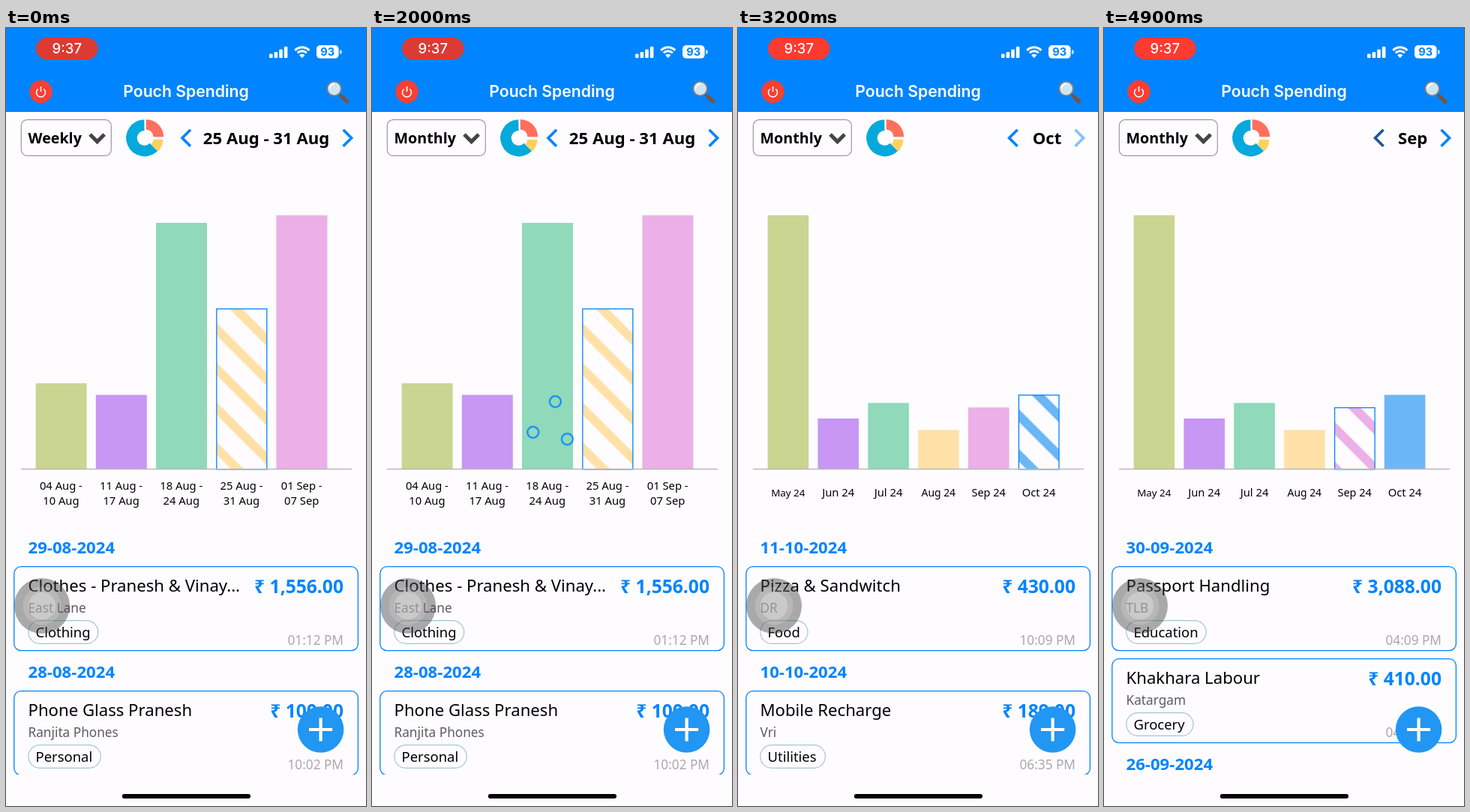
Recreate the animation shown at these times as an HTML page. Size 480 by 1038 pixels, loop 5 s.

```html
<!DOCTYPE html>
<html lang="en">
<head>
<meta charset="utf-8">
<title>Weekly and monthly spending</title>
<style>
html, body { margin: 0; width: 100%; height: 100%; overflow: hidden; background: #fefcff; }
svg { display: block; width: 100%; height: 100%; font-family: "Noto Sans", "Open Sans", sans-serif; }
.ui { font-family: Inter, Roboto, sans-serif; font-weight: 600; fill: #fff; text-anchor: middle; }
.bold { font-weight: 700; font-size: 22.15px; }
.date, .amount { font-weight: 700; fill: #0084ff; }
.date { font-size: 22.15px; }
.amount { font-size: 24.6px; text-anchor: end; }
.name { font-size: 22.15px; }
.shop, .time { font-size: 17.23px; fill: #5c5c5e; }
.time { fill: #aaa8ab; text-anchor: end; }
.tag { font-size: 18.46px; }
.tick { font-size: 14.77px; text-anchor: middle; }
.end { text-anchor: end; }
.mode { font-size: 19.7px; }
.line { fill: none; stroke: #0a84ff; stroke-width: 3.7; }

/* Hard switches on one shared 5 s clock */
.step { animation: 5s step-end infinite; }
.week { animation-name: week; }
.month { animation-name: month; }
.oct { animation-name: oct; }
.sep { animation-name: sep; }
.weekly { animation-name: weekly; }
.monthly { animation-name: monthly; }
.load { animation-name: load; }
.press { animation-name: press; }
@keyframes week { 0% { visibility: visible } 42%, 100% { visibility: hidden } }
@keyframes month { 0% { visibility: hidden } 42%, 100% { visibility: visible } }
@keyframes oct { 0% { visibility: hidden } 42% { visibility: visible } 86%, 100% { visibility: hidden } }
@keyframes sep { 0% { visibility: hidden } 86%, 100% { visibility: visible } }
@keyframes weekly { 0% { visibility: visible } 38%, 100% { visibility: hidden } }
@keyframes monthly { 0% { visibility: hidden } 38%, 100% { visibility: visible } }
@keyframes load { 0% { visibility: hidden } 38% { visibility: visible } 42%, 100% { visibility: hidden } }
@keyframes press { 0% { stroke: #0a84ff } 82% { stroke: #20579a } 84% { stroke: #0a84ff } 96%, 100% { stroke: #20579a } }

.rec { animation: pulse 5s ease-in-out infinite; }
@keyframes pulse { 0%, 40%, 80% { fill: #db3b33 } 20%, 60%, 100% { fill: #ff3b30 } }
.spin { animation: spin 1s linear infinite; }
@keyframes spin { to { transform: rotate(360deg) } }
</style>
</head>
<body>
<svg id="stage" viewBox="0 0 480 1038" preserveAspectRatio="none"></svg>
<script>
const BLUE = '#0084ff', PAPER = '#fefcff';
const COLORS = ['#c9d591', '#c797f3', '#90d9bb', '#ffe1a8', '#eab0e7', '#6bb6f7'];
const FLOOR = 588.5;

const text = (x, y, cls, str, extra = '') =>
  `<text x="${x}" y="${y}" class="${cls}" ${extra}>${str.replace(/&/g, '&amp;')}</text>`;
const step = (name, body) => `<g class="step ${name}">${body}</g>`;
const box = (x, y, w, h, r, attrs) =>
  `<rect x="${x}" y="${y}" width="${w}" height="${h}" rx="${r}" ${attrs}/>`;
const disc = (x, y, r, attrs) => `<circle cx="${x}" cy="${y}" r="${r}" ${attrs}/>`;

function arc(cx, cy, r, from, to, attrs) {
  const at = deg => {
    const a = deg * Math.PI / 180;
    return `${(cx + r * Math.cos(a)).toFixed(2)} ${(cy + r * Math.sin(a)).toFixed(2)}`;
  };
  return `<path d="M${at(from)}A${r} ${r} 0 ${to - from > 180 ? 1 : 0} 1 ${at(to)}" fill="none" ${attrs}/>`;
}

function bar(i, x, top, w, hatched) {
  const h = FLOOR - top, color = COLORS[i];
  if (!hatched) return box(x, top, w, h, 0, `fill="${color}"`);
  return `<g transform="translate(${x} ${top})">
    <pattern id="hatch${i}" width="10" height="37.4" patternUnits="userSpaceOnUse" patternTransform="rotate(45)">
      <rect y="13" width="10" height="12" fill="${color}"/></pattern>
    ${box(0, 0, w, h, 0, `fill="${PAPER}"`)}
    ${box(.6, .3, w - 1, h, 0, `fill="url(#hatch${i})" stroke="${BLUE}" stroke-width="1.3"`)}</g>`;
}

const axis = `<path d="M20 ${FLOOR}H461" stroke="#b9b7ba" stroke-width="1.3"/>`;

function weekChart() {
  const tops = [474, 489.5, 260, 374.5, 249.8];
  const labels = ['04 Aug -|10 Aug', '11 Aug -|17 Aug', '18 Aug -|24 Aug', '25 Aug -|31 Aug', '01 Sep -|07 Sep'];
  return tops.map((top, i) => {
    const x = 39.6 + i * 80.2, [a, b] = labels[i].split('|');
    return bar(i, x, top, 68, i === 3) + text(x + 33.8, 616, 'tick', a) + text(x + 33.8, 636, 'tick', b);
  }).join('') + axis;
}

const monthTops = [249.8, 521, 500.3, 536.3, 506.3, 489.5];
const monthX = i => 39.6 + i * 66.84;
const monthBar = (i, hatched) => bar(i, monthX(i), monthTops[i], 54.6, hatched);

function monthChart() {
  const names = ['May', 'Jun', 'Jul', 'Aug', 'Sep', 'Oct'];
  const sizes = [13.4, 14.77, 14.77, 13.9, 14.5, 14.77];
  return names.map((n, i) => (i < 4 ? monthBar(i) : '') +
    text(monthX(i) + 27.2, 625, 'tick', n + ' 24', `style="font-size:${sizes[i]}px"`)).join('');
}

const date = (y, str) => text(29.5, y, 'date', str);

function card(y, name, shop, tag, tagWidth, amount, time) {
  return box(10.8, y, 458.6, 112, 9, `fill="${PAPER}" stroke="${BLUE}" stroke-width="1.3"`) +
    text(29.5, y + 33.5, 'name', name) +
    text(29.5, y + 61.5, 'shop', shop) +
    box(29.8, y + 72, tagWidth, 30.6, 15.3, 'fill="none" stroke="#a3c8c8" stroke-width="1.2"') +
    text(39.5, y + 94, 'tag', tag) +
    text(450, y + 35.5, 'amount', '₹ ' + amount) +
    text(450, y + 104, 'time', time);
}

const weekList = date(700.5, '29-08-2024') +
  card(718.7, 'Clothes - Pranesh & Vinay...', 'East Lane', 'Clothing', 93, '1,556.00', '01:12 PM') +
  date(866.5, '28-08-2024') +
  card(884.7, 'Phone Glass Pranesh', 'Ranjita Phones', 'Personal', 96.5, '100.00', '10:02 PM');
const octList = date(700.5, '11-10-2024') +
  card(718.7, 'Pizza & Sandwitch', 'DR', 'Food', 63.2, '430.00', '10:09 PM') +
  date(866.5, '10-10-2024') +
  card(884.7, 'Mobile Recharge', 'Vri', 'Utilities', 86.6, '189.00', '06:35 PM');
const sepList = date(700.5, '30-09-2024') +
  card(718.7, 'Passport Handling', 'TLB', 'Education', 106.4, '3,088.00', '04:09 PM') +
  card(841.7, 'Khakhara Labour', 'Katargam', 'Grocery', 89.2, '410.00', '04:05 PM') +
  date(989.5, '26-09-2024');

function picker(label, shift) {
  const cx = 184.7 + shift;
  return box(20.3, 122.4, 120 + shift, 48, 8, 'fill="none" stroke="#9b999c" stroke-width="1.2"') +
    text(29.5, 154, 'bold mode', label) +
    `<path d="M${112 + shift} 142l9.6 9.6l9.6-9.6" fill="none" stroke="#454547" stroke-width="5"/>` +
    arc(cx, 146.8, 17.2, 45, 269, 'stroke="#06a9db" stroke-width="14.6"') +
    arc(cx + 2, 145.3, 16.6, -90, 0, 'stroke="#ff6f5e" stroke-width="13.6"') +
    arc(cx + 2.2, 148.6, 16, 1, 45, 'stroke="#ffd15c" stroke-width="13"');
}

const left = (x, cls = '') => `<path d="M${x + 10.6} 135.8l-11 11l11 11" class="line ${cls}"/>`;
const right = (opacity = 1) => `<path d="M449.6 135.8l11 11l-11 11" class="line" opacity="${opacity}"/>`;
const heading = str => text(431.3, 154.7, 'bold end', str);

function statusBar() {
  const bars = [5.5, 8, 11.5, 15.3].map((h, i) => box(351 + i * 6.6, 40 - h, 4.6, h, 1.3, 'fill="#fff"')).join('');
  const wifi = [13.2, 8.3].map(r => arc(394.8, 39, r, -136, -44, 'stroke="#fff" stroke-width="3.1"')).join('') +
    '<path d="M394.8 40l-3.6-3.8a5.2 5.2 0 0 1 7.2 0z" fill="#fff"/>';
  return box(40, 13, 82.6, 29, 14.5, 'class="rec"') +
    text(81.3, 34.2, 'ui', '9:37', 'style="font-size:18.5px;font-weight:500"') + bars + wifi +
    box(414, 23, 29.6, 17.6, 5, 'fill="#fff"') +
    '<path d="M445 29a3 3 0 0 1 0 6z" fill="#fff" opacity=".7"/>' +
    text(428.8, 37, 'ui', '93', `style="font-size:14.6px;font-weight:700;fill:${BLUE}"`);
}

const power = disc(46.5, 85, 15.2, 'fill="#f93f33"') +
  arc(46.5, 86, 6, -52, 232, 'stroke="#fff" stroke-width="1.6"') +
  '<path d="M46.5 78V85" stroke="#fff" stroke-width="1.6"/>';

const lens = '<path d="M444.5 88.5l4.5 4.2" stroke="#55585e" stroke-width="3"/>' +
  '<path d="M448.3 92.2l6.6 5.8" stroke="#7d5236" stroke-width="5" stroke-linecap="round"/>' +
  disc(437.6, 81, 9.4, 'fill="#cde6f4" stroke="#777d86" stroke-width="2"') +
  arc(437.6, 81, 6.3, 190, 265, 'stroke="#fff" stroke-width="2" stroke-linecap="round"');

const loader = `<g transform="translate(240.5 527.5)"><g class="spin">` +
  [[3.7, -29], [-25.7, 12], [20, 21]].map(([x, y]) =>
    disc(x, y, 7.5, `fill="none" stroke="${BLUE}" stroke-width="2"`)).join('') + '</g></g>';

const addButton = disc(419.6, 936, 30.8, 'fill="#2196f3"') +
  '<path d="M404 936h31.2M419.6 920.4v31.2" stroke="#fff" stroke-width="4.2"/>';

const touchBall = disc(48, 771, 37, 'fill="#434343" fill-opacity=".45"') +
  disc(48, 771, 25.5, 'fill="#fff" fill-opacity=".16"') +
  disc(48, 771, 18.3, 'fill="#fff" fill-opacity=".26"');

document.getElementById('stage').innerHTML =
  `<clipPath id="view"><rect width="480" height="996"/></clipPath>` +
  box(0, 0, 480, 1038, 0, `fill="${PAPER}"`) +
  box(0, 0, 480, 112, 0, `fill="${BLUE}"`) +
  statusBar() + power + lens +
  text(240, 92.3, 'ui', 'Pouch Spending', 'style="font-size:21.2px"') +
  step('weekly', picker('Weekly', 0)) +
  step('monthly', picker('Monthly', 11)) +
  step('week', left(235.4) + heading('25 Aug - 31 Aug') + right() + weekChart()) +
  step('month', left(362, 'step press') + monthChart()) +
  step('oct', heading('Oct') + right(.5) + monthBar(4) + monthBar(5, true) + axis) +
  step('sep', heading('Sep') + right() + monthBar(4, true) + monthBar(5) + axis) +
  '<g clip-path="url(#view)">' +
  step('week', weekList) + step('oct', octList) + step('sep', sepList) + '</g>' +
  step('load', loader) + addButton + touchBall +
  box(154.8, 1022, 171.2, 6, 3, 'fill="#000"');
</script>
</body>
</html>
```
